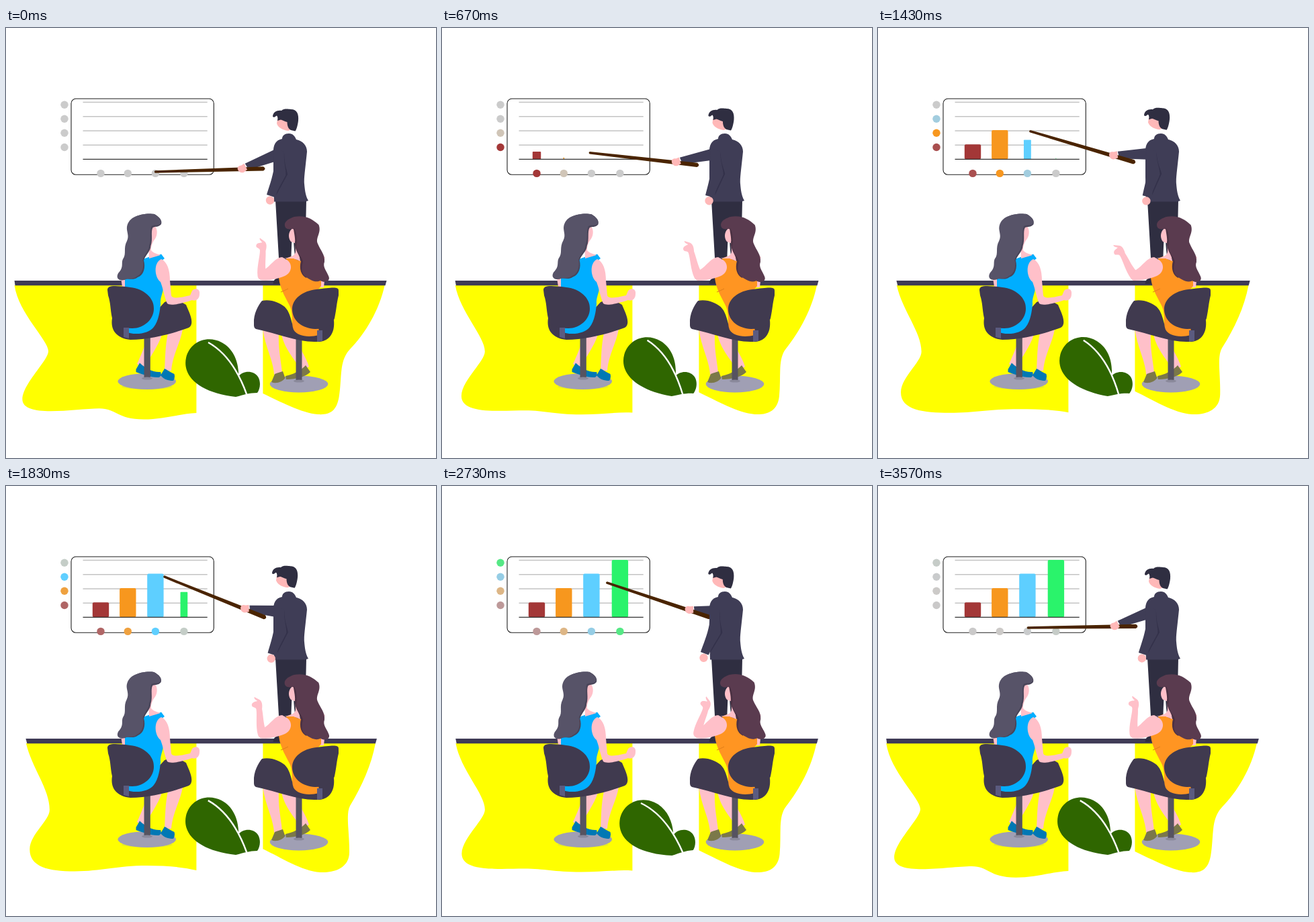
An HTML page that plays this animation: 640x640 px, repeating every 3610 ms.

```html
<!DOCTYPE html>
<html lang="en">
<head>
<meta charset="utf-8">
<title>Presentation</title>
<style>
html, body { margin: 0; width: 100%; height: 100%; overflow: hidden; background: #fff; }
svg { display: block; width: 100vw; height: 100vh; }
</style>
</head>
<body>
<svg viewBox="0 0 640 640">
  <g fill="#ff0"><path id="landL"/><path id="landR"/></g>
  <path id="floor" fill="#3f3b56"/>

  <g id="board">
    <rect x="97" y="105.3" width="212.3" height="113" rx="7" fill="#fff" stroke="#222" stroke-width="1.1"/>
    <path d="M114.5 110.5H299.7M114.5 131.8H299.7M114.5 153H299.7M114.5 174.2H299.7" stroke="#c4c4c4" stroke-width="1.5"/>
    <g id="bars"></g>
    <path d="M114.5 195.3H299.7" stroke="#333" stroke-width="1.3"/>
    <g id="dots"></g>
  </g>

  <g id="man">
    <path fill="#2f2e41" d="M401 256H447L445 350H432C428 330 428 315 428 300L426 300L423 376H408Z"/>
    <path fill="#2f2e41" d="M397.500 381C398 374 403 371 408 372L414 381Z"/>
    <g id="head">
      <path fill="#ffb8b8" d="M404 136L403 142C404 147 411 152 420 153L425 151L420 137L408 132Z"/>
      <path fill="#2f2e41" d="M397 132C397 125 404 122 410 123C413 119.500 420 120.500 424 121C433 121 436 128 435 138C434 146 432 152 430.500 153.500L424 152C420 150 418.500 145 418.500 140C415 139.500 412 137 409 136.500L404 138C405 134 404 131.500 403 130.500C401 131 400 134 397 132Z"/>
    </g>
    <path id="sleeve" fill="#3f3d56"/>
    <path id="stick" fill="#4a2400" d="M-129 -1.700Q-131.500 0 -129 1.800L32 3.200Q37 0 32 -3.200Z"/>
    <path id="fist" fill="#ffb8b8" d="M-6 -1C-6 -5 -2 -6 1 -5L6 -6L7 4L1 6C-3 6 -6 3 -6 -1Z"/>
    <path fill="#3f3d56" d="M398 190C397 176 400 167 411 165C411 160 415 157 421 157C427 157 430 161 432 166C442 168 448 175 448 184C446 205 443 225 444 232C445 245 447 252 450 257L445 258.500H399L398 222Z"/>
    <g id="arm">
      <circle cx="393" cy="256.500" r="6.200" fill="#ffb8b8"/>
      <path fill="#33314a" d="M414 186C414 203 418 210 419 218L402 249L408 226Z"/>
      <path fill="#3f3d56" d="M399 178L414 184C413 200 417 210 416.500 219C411 230 405 239 400 252L388 248C391 238 397 222 399 207Z"/>
    </g>
  </g>

  <g id="leaf">
    <path fill="#2f6600" d="M342 549C290 543 262 520 268 491C274 466 300 457 321 468C340 478 347 500 346 519C352 510 368 509 375 519C380 527 378 538 374 543C362 543 354 546 342 549Z"/>
    <path fill="none" stroke="#fff" stroke-width="2.400" d="M301 468C328 483 346 511 358.500 546"/>
  </g>

  <g id="guestA">
    <ellipse cx="210" cy="534" rx="38" ry="4" fill="#e9ee20"/>
    <ellipse cx="209.700" cy="526" rx="43.300" ry="12" fill="#a09fb4"/>
    <g fill="#ffc0c9">
      <path d="M211 459L232 456C227 474 213 490 206 507L195 500C201 487 206 475 211 459Z"/>
      <path d="M241 454L263 448C260 468 248 486 246 510H236C237 490 237 473 241 454Z"/>
    </g>
    <path fill="#0078b4" d="M193.500 508L199 498.500C206 505 218 513 230 512Q232 517 228 520C217 521 202 515 193.500 512ZM230 517L236 507C240 509 246 513 250.500 515Q252 521 249 525C241 525 235 523 230 517Z"/>
    <path fill="#565360" d="M205.500 455H214.800V521H205.500Z"/>
    <ellipse cx="210" cy="521.500" rx="8" ry="2" fill="#8a899b"/>
    <path fill="#403a4f" d="M158 432C155 450 165 462 185 464C215 464 250 454 272 446C282 440 272 422 268 412C258 405 245 404 236 408L214 432Z"/>
    <path fill="#ffc0c9" d="M171 372L179 370V385H173Z"/>
    <path fill="#00aeff" d="M231 336.500L236 343L228 349C222 358 231 374 234 388C233 396 229 402 230 411C229 422 227 436 220 445C213 455 192 458 177 452L177 360C186 347 205 345 214 340Q223 340 231 336.500Z"/>
    <path fill="#ffc0c9" d="M231 344C240 348 244 360 244 376L246 398C247 403 257 402 274 398L277 391C282 386 289 388 288 396C288 404 282 407 277 405C262 410 245 414 240 410C236 402 234 388 230 378C221 371 219 350 231 344Z"/>
    <path fill="#403a4f" d="M151 390C151 383 160 383 185 386C205 388 221 402 220 418C220 434 205 447 188 447C172 447 162 444 158 432C155 418 156 410 152 398Z"/>
    <path fill="#5b5b80" d="M175 446H183V462L175 460Z"/>
    <path fill="#ffc0c9" d="M217 294C226 293 227 308 221 315C218 319 215.500 325 216 331C219 335 225 336 230 338L213 343L212 320Z"/>
    <g id="hairA">
      <path fill="#494559" d="M189 283C200 276 214 276 221 277C228 281 233 286 231 292C227 297 222 295 218.500 297C215 303 219 315 215.500 324C215 333 208 337 205 346C208 356 205 368 196 371C188 377 182 371 176 375L184 320Z"/>
      <path fill="#575368" d="M188 283C200 276 214 276 220 277C227 281 232 286 230 291C226 295 220 292 216.500 295C213 303 217 315 213 323C213 332 206 336 203.500 345C206 355 203 366 195 369.500C188 376 182 371 176 375C168 377 163 372 167 365C176 356 171 350 174 344C180 336 174 328 180 317C184 309 179 303 180 296C181 290 184 286 188 283Z"/>
    </g>
  </g>

  <g id="guestB">
    <ellipse cx="436" cy="530" rx="43.300" ry="12.500" fill="#a09fb4"/>
    <g fill="#ffc0c9">
      <path d="M382.500 450L406 455C405 480 410 498 411 514L399 516C398 495 386 475 382.500 450Z"/>
      <path d="M410 456L432 462C437 478 447 490 451 504L440 511C432 495 415 480 410 456Z"/>
    </g>
    <path fill="#7b7849" d="M395 527L400 515C404 513 409 512 412 511L415.500 521C411 527 402 530 395 527ZM416 518C426 516 438 511 446 502L453 512C446 519 432 523 417 523Z"/>
    <path fill="#565360" d="M431.500 460H440.500V525H431.500Z"/>
    <ellipse cx="436" cy="525.500" rx="8" ry="2" fill="#8a899b"/>
    <path fill="#403a4f" d="M369 440C368 425 376 412 381 406C395 403 408 410 412 413C420 418 423 428 426 440L488 435C490 455 480 468 462 467C435 468 405 455 372 448C369 446 369 444 369 440Z"/>
    <path fill="#ffc0c9" d="M466 374L474 376L473 386H466Z"/>
    <path fill="#ff9522" d="M417 343L424 340C432 345 437 347 442 347L469 372V384L462 392L466 457C450 461 434 459 428 449C424 438 428 428 423 415C418 404 408 390 406 372C414 366 420 356 417 343Z"/>
    <path fill="none" stroke="#e07d18" d="M409 393Q414 391 420 388"/>
    <path fill="#ffc0c9" d="M418 345C427 351 426 364 415 369C402 374 390 377 379 375C372 370 376 362 384 360C394 354 400 342 411 341Z"/>
    <path id="forearm" fill="#ffc0c9" d="M374.500 369C373 356 378 340 378 331C378 327 371 328 372.500 323C374 319 380 320 381.500 319C378 316 377 314 378 312.500L384 317C389 320 388 327 386.500 332C387 342 385 352 387 364L384 375C379 376 375 374 374.500 369Z"/>
    <path fill="#403a4f" d="M495 391C495 385 487 386 462 389C442 391 425 403 426 420C427 437 442 447 460 448C476 448 485 444 489 432C492 418 492 410 495 398Z"/>
    <path fill="#5b5b80" d="M463 450H471V466L463 467Z"/>
    <path fill="#ffc0c9" d="M429 297C420 300 419 312 424 318L432 321ZM430 317L434 322L438 347L428 343L414 343C424 341 431 339 431 332ZM469 335L474.500 341L473 349Z"/>
    <g id="hairB">
      <path fill="#4b3143" d="M418 296L428 299.500C429 306 431 314 430 323C431 332 437 338 439 347C436 358 439 368 447 372L460 340L440 285Z"/>
      <path fill="#5a3b4f" d="M416 297C412 289 420 284 429 281C445 278 456 284 465.500 293C470 305 460 312 464 321C468 331 475 337 474 348C471 356 477 361 480 369C484 377 474 380 468 376C460 380 452 374 447 371C440 367 439 358 442 348C441 340 433 336 432 326C434 314 432 303 429 298.500C424 299 420 301 416 297Z"/>
    </g>
  </g>
</svg>
<script>
const LOOP = 3610, STEP = LOOP / 6;
const GROW = 840, LAG = 405, FIRST = 170;
const NS = 'http://www.w3.org/2000/svg';
const $ = id => document.getElementById(id);
const set = (el, attrs) => { for (const k in attrs) el.setAttribute(k, attrs[k]); return el; };
const add = (parent, tag, attrs) => parent.appendChild(set(document.createElementNS(NS, tag), attrs));
const clamp = v => Math.max(0, Math.min(1, v));
const lerp = (a, b, p) => a + (b - a) * p;

// Linear track of [time, value] keys
function track(t, ...keys) {
  let i = 1;
  while (i < keys.length - 1 && t > keys[i][0]) i++;
  const [t0, a] = keys[i - 1], [t1, b] = keys[i];
  return lerp(a, b, clamp((t - t0) / (t1 - t0)));
}

// Blend two path strings with the same commands
function morph(a, b, p) {
  const to = b.match(/[\d.]+/g);
  let i = 0;
  return a.replace(/[\d.]+/g, n => lerp(+n, +to[i++], p).toFixed(2));
}

const land = {
  landL: ['M12 383C18 425 63 465 63 481C63 495 24 530 24 553C24 582 105 566 140 566C165 566 165 583 205 583C235 583 260 574 283.400 573L283.400 383Z',
          'M31 383C40 420 65 450 65 482C65 498 36 518 36 540C36 566 60 574 100 574C140 574 165 564 210 564C240 564 265 567 283.400 572L283.400 383Z'],
  landR: ['M382.400 383L564 383C556 420 535 455 512 478C495 496 500 520 495 550C491 572 480 576 464 575C440 573 408 556 382.400 544Z',
          'M382.400 383L549 383C543 415 530 445 512 476C506 488 512 515 512 545C512 568 490 576 468 575C440 573 410 553 382.400 540Z'],
  floor: ['M12 376L567 376L565 383.300L13 383.300Z', 'M30.500 376L551 376L549 383.300L32.500 383.300Z']
};

const grey = [203, 203, 203];
const series = [
  { x: 141, h: 22, dotY: 177.500, rgb: [163, 55, 55] },
  { x: 181.300, h: 43.300, dotY: 156.300, rgb: [247, 151, 30] },
  { x: 222.400, h: 64.700, dotY: 135.300, rgb: [94, 207, 255] },
  { x: 264.900, h: 85.300, dotY: 114.200, rgb: [42, 243, 107] }
];
for (const s of series) {
  s.bar = add($('bars'), 'rect', { x: -12.200, y: -s.h, width: 24.400, height: s.h, rx: 2, fill: `rgb(${s.rgb})` });
  s.dots = [[87, s.dotY], [s.x, 216.400]].map(([cx, cy]) => add($('dots'), 'circle', { cx, cy, r: 5.700 }));
}

const spin = (id, angle, x, y) => set($(id), { transform: `rotate(${angle} ${x} ${y})` });

function drawChart(t) {
  series.forEach((s, i) => {
    const begin = FIRST + LAG * i;
    const size = clamp((t - begin) / GROW) ** 1.3;
    set(s.bar, { transform: `translate(${s.x} 195.300) scale(${size})` });
    const lit = STEP * (i + 1);
    const hold = Math.max(lit + 1, begin + GROW);
    const glow = track(t, [lit - STEP, 0], [lit, 1], [hold, 1], [LOOP, 0]);
    const fill = `rgb(${grey.map((g, k) => Math.round(lerp(g, s.rgb[k], glow)))})`;
    s.dots.forEach(d => set(d, { fill }));
  });
}

function drawPointer(t) {
  const x = track(t, [0, 351], [670, 348], [1430, 350], [1830, 355], [2400, 372], [3070, 363], [LOOP, 351]);
  const y = track(t, [0, 209], [670, 199], [1430, 189], [1830, 182], [2400, 172.500], [3070, 195], [LOOP, 209]);
  const tilt = track(t, [0, -1.600], [670, 6.500], [1430, 16.500], [1830, 22], [2370, 27], [3070, 10.600], [LOOP, -1.600]);
  set($('stick'), { transform: `translate(${x} ${y + 1.300}) rotate(${tilt})` });
  const sx = 408, sy = 187, len = Math.hypot(sx - x, sy - y);
  const ux = (sx - x) / len, uy = (sy - y) / len;
  const at = (d, side) => `${x + ux * d - uy * side} ${y + uy * d + ux * side}`;
  set($('sleeve'), { d: `M${at(7, -5)}L${at(len, -9)}L${at(len, 9)}L${at(9, 5.500)}Z` });
  set($('fist'), { transform: `translate(${x} ${y + 0.5}) rotate(${Math.atan2(uy, ux) * 180 / Math.PI})` });
}

function draw(t) {
  const p = track(t, [0, 0.03], [1725, 1], [3540, 0], [LOOP, 0.03]);
  for (const id in land) set($(id), { d: morph(...land[id], p) });
  drawChart(t);
  drawPointer(t);
  const hx = track(t, [0, 0], [1200, -1], [2400, -1], [LOOP, 0]);
  const hy = track(t, [0, 0], [1200, -1.800], [1900, -1.800], [LOOP, 0]);
  set($('head'), { transform: `translate(${hx} ${hy})` });
  spin('arm', track(t, [0, 0], [1250, -6.300], [2400, 3.600], [LOOP, 0]), 407, 180);
  spin('leaf', track(t, [0, 0], [1180, 5.800], [2390, -5.300], [LOOP, 0]), 358, 545);
  spin('hairA', track(t, [0, 0], [670, 1.800], [1430, 0.6], [2400, -1.900], [LOOP, 0]), 215, 335);
  spin('hairB', track(t, [0, 0], [1200, 0.5], [2700, -1.300], [LOOP, 0]), 432, 335);
  spin('forearm', track(t, [0, 0], [1330, -37], [2390, 22.500], [LOOP, 0]), 383, 367);
}

const start = performance.now();
function tick() {
  draw((performance.now() - start) % LOOP);
  requestAnimationFrame(tick);
}
tick();
</script>
</body>
</html>
```
